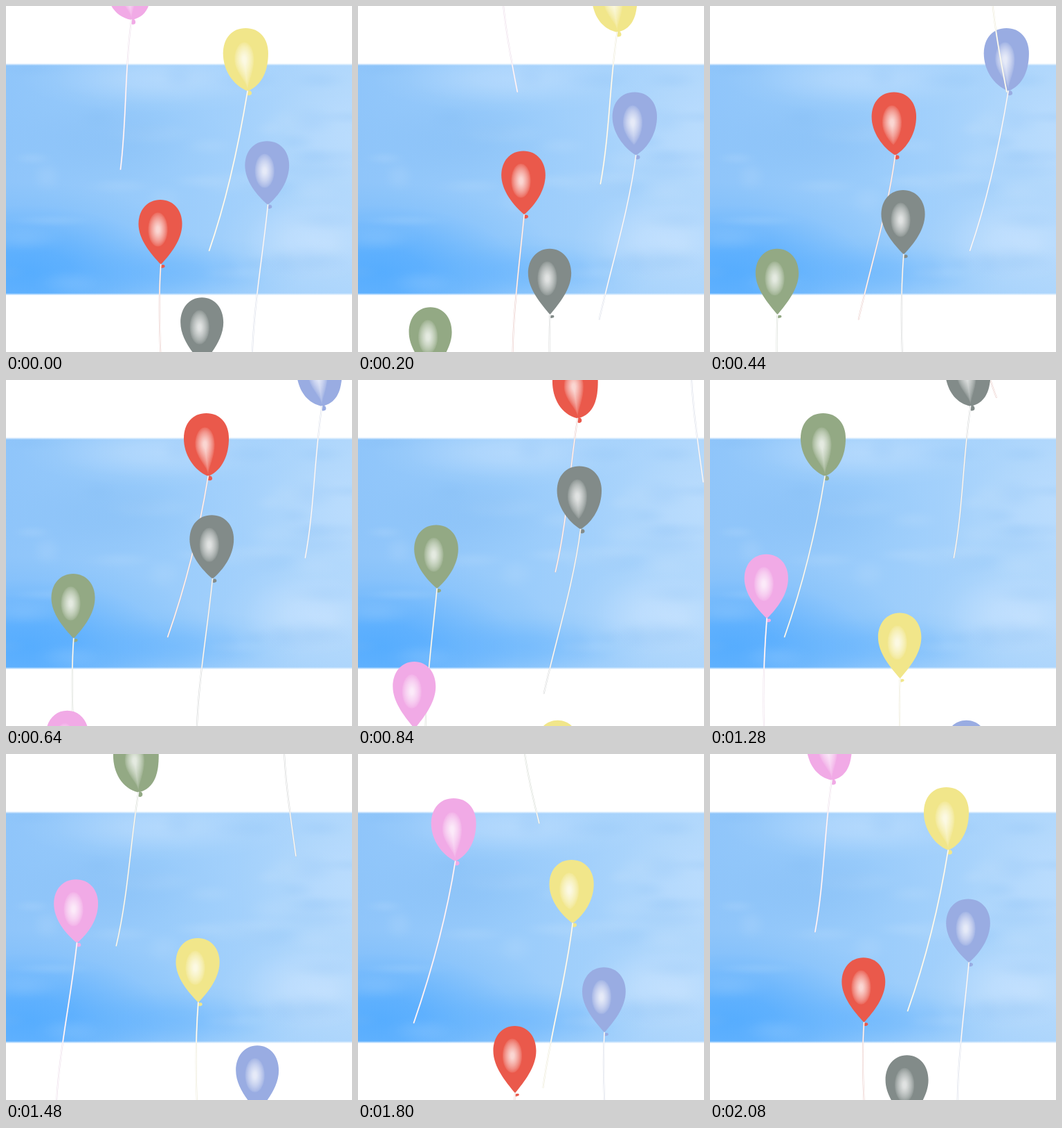
These frames come from a looping animation (500x500 px, 2120 ms). An HTML page with a canvas:

```html
<!DOCTYPE html>
<html lang="en">
<head>
<meta charset="utf-8">
<title>Balloons</title>
<style>
  html, body { margin: 0; width: 100%; height: 100%; overflow: hidden; background: #fff; }
  canvas { position: absolute; left: 0; top: 0; width: 500px; height: 500px; }
</style>
</head>
<body>
<canvas id="sky" width="500" height="500"></canvas>
<canvas id="air" width="500" height="500"></canvas>
<script>
const LOOP = 2120, STEP = 40, LEAD = 400;

// All balloons fly the same path, shifted in time and sideways; back to front
const BALLOONS = [
  { start: 320, dx: -178, base: '#93a984' },
  { start: 1800, dx: -52, base: '#ea594b' },
  { start: 80, dx: 2, base: '#828b89' },
  { start: 1560, dx: 82, base: '#99ace2' },
  { start: 880, dx: -198.5, base: '#f1aae6' },
  { start: 1120, dx: 0, base: '#f1e68a' }
];

const rgb = hex => [1, 3, 5].map(i => parseInt(hex.slice(i, i + 2), 16));
const clamp = v => Math.min(1, Math.max(0, v));
const mix = (a, b, k) => a + (b - a) * k;
const tint = (hex, to, k) =>
  `rgb(${rgb(hex).map((v, i) => Math.round(mix(v, rgb(to)[i], k))).join()})`;
const wave = (s, peak, half) => Math.cos(Math.PI * (s - peak) / half);

// Pose on the flight path at time s
function pose(s) {
  const up = clamp(s / 1240), u = s - 320;
  const lift = 9e-5 * Math.max(0, s - 700) ** 2;
  return {
    up,
    x: 263 + 0.04 * u + 0.08 * Math.hypot(u, 150) + 0.05 * lift,
    y: 393 - 0.353 * s - lift,
    w: 31 + 2 * up,
    h: 91 + 6 * (1 - up) ** 3,
    lean: 0.5 + 3.5 * up * up,
    tail: clamp((s - 620) / 330),
    // The string swings like a pendulum while a bend travels down it
    swing: -17 + 0.022 * (s - 920) - 43 * wave(s, 920, 700),
    drop: 237 - 0.8 * lift,
    bowA: 5 * wave(s, 910, 570),
    bowB: 5 * wave(s, 980, 570)
  };
}

const g = document.getElementById('air').getContext('2d');

function drawBody({ w, h, lean, up }) {
  const round = up * up;
  const cx = w * mix(0.43, 0.8, round), cy = h * mix(0.83, 0.95, round);
  const side = h * mix(0.37, 0.42, round), low = h * mix(0.61, 0.68, round);
  g.beginPath();
  g.moveTo(0, 0);
  g.bezierCurveTo(w * 0.6, 0, w, h * 0.16, w, side);
  g.bezierCurveTo(w, low, lean + cx, cy, lean, h);
  g.bezierCurveTo(lean - cx, cy, -w, low, -w, side);
  g.bezierCurveTo(-w, h * 0.16, -w * 0.6, 0, 0, 0);
  g.fill();
}

// Nested shapes blending from body colour to highlight, growing a tail in flight
function drawGlow(base, { lean, tail }) {
  const layers = 14, y = mix(43, 45, tail), x = mix(-3.5, -2, tail);
  for (let k = 1; k <= layers; k++) {
    const f = 1 - (k - 1) / layers, rx = 14 * f, ry = 24.5 * f;
    const tip = y + ry * (1 + 0.75 * tail), tx = mix(x, lean, tail * f);
    const tc = rx * mix(0.55, 0.08, tail), bend = y + ry * mix(0.55, 0.75, tail);
    const rise = tip - ry * 0.45 * tail;
    g.fillStyle = tint(base, '#ffffff', 0.75 * Math.min(1, 1.1 * (k / layers) ** 0.7));
    g.beginPath();
    g.moveTo(x, y - ry);
    g.bezierCurveTo(x + rx * 0.55, y - ry, x + rx, y - ry * 0.55, x + rx, y);
    g.bezierCurveTo(x + rx, bend, tx + tc, rise, tx, tip);
    g.bezierCurveTo(tx - tc, rise, x - rx, bend, x - rx, y);
    g.bezierCurveTo(x - rx, y - ry * 0.55, x - rx * 0.55, y - ry, x, y - ry);
    g.fill();
  }
}

// Cubic through two points bowed sideways at one and two thirds of its length
function drawString(base, { lean, h, swing, drop, bowA, bowB }) {
  g.beginPath();
  g.moveTo(lean, h);
  g.bezierCurveTo(
    lean + swing / 3 + 3 * bowA - 1.5 * bowB, h + drop / 3,
    lean + swing * 2 / 3 + 3 * bowB - 1.5 * bowA, h + drop * 2 / 3,
    lean + swing, h + drop);
  g.lineCap = 'round';
  g.strokeStyle = tint(base, '#e6e6e6', 0.75);
  g.lineWidth = 2;
  g.stroke();
  g.strokeStyle = '#fff';
  g.lineWidth = 1.1;
  g.stroke();
}

function drawBalloon({ start, dx, base }, t) {
  const p = pose((t - start + LEAD + LOOP) % LOOP - LEAD);
  g.save();
  g.translate(p.x + dx, p.y);
  g.fillStyle = base;
  drawBody(p);
  g.beginPath();
  g.ellipse(p.lean + 2.4, p.h + 2.8, 3.5, mix(1.8, 3.8, p.up), -0.2, 0, 2 * Math.PI);
  g.fill();
  drawGlow(base, p);
  drawString(base, p);
  g.restore();
}

const c = document.getElementById('sky').getContext('2d');
const DEEP = '80,170,255', DUSK = '125,184,242', PALE = '208,231,255';

function cloud(x, y, rx, ry, tone, alpha) {
  const soft = c.createRadialGradient(0, 0, 0, 0, 0, 1);
  for (const r of [0, 0.25, 0.5, 0.75, 1]) {
    soft.addColorStop(r, `rgba(${tone},${alpha * (1 + Math.cos(Math.PI * r)) / 2})`);
  }
  c.save();
  c.translate(x, y);
  c.scale(rx, ry);
  c.fillStyle = soft;
  c.fillRect(-1, -1, 2, 2);
  c.restore();
}

function drawSky() {
  const base = c.createLinearGradient(0, 200, 500, 160);
  base.addColorStop(0, '#8fc5fa');
  base.addColorStop(0.45, '#9accfb');
  base.addColorStop(1, '#b0d7fc');
  c.save();
  c.beginPath();
  c.rect(0, 83, 500, 335);
  c.clip();
  c.fillStyle = base;
  c.fillRect(0, 83, 500, 335);

  cloud(30, 385, 270, 130, DEEP, 0.9);
  cloud(240, 385, 190, 55, DEEP, 0.4);
  cloud(150, 195, 170, 80, DUSK, 0.3);
  cloud(220, 105, 200, 50, PALE, 0.45);
  cloud(440, 340, 130, 80, PALE, 0.6);
  cloud(490, 190, 160, 130, PALE, 0.3);

  // Seeded wisps
  let seed = 7;
  const rnd = (lo, hi) => {
    seed = seed * 16807 % 2147483647;
    return mix(lo, hi, seed / 2147483647);
  };
  for (let i = 0; i < 40; i++) {
    cloud(rnd(0, 500), rnd(90, 410), rnd(25, 80), rnd(10, 28), i % 2 ? PALE : DUSK, 0.14);
  }

  // Faded upper and lower rim
  [0.8, 0.5, 0.2].forEach((a, i) => {
    c.fillStyle = `rgba(255,255,255,${a})`;
    c.fillRect(0, 83 + i, 500, 1);
    c.fillRect(0, 417 - i, 500, 1);
  });
  c.restore();
}

let begin = null;
function frame(now) {
  if (begin === null) begin = now;
  const t = Math.floor((now - begin) / STEP) * STEP % LOOP;
  g.clearRect(0, 0, 500, 500);
  for (const b of BALLOONS) drawBalloon(b, t);
  requestAnimationFrame(frame);
}

drawSky();
requestAnimationFrame(frame);
</script>
</body>
</html>
```
